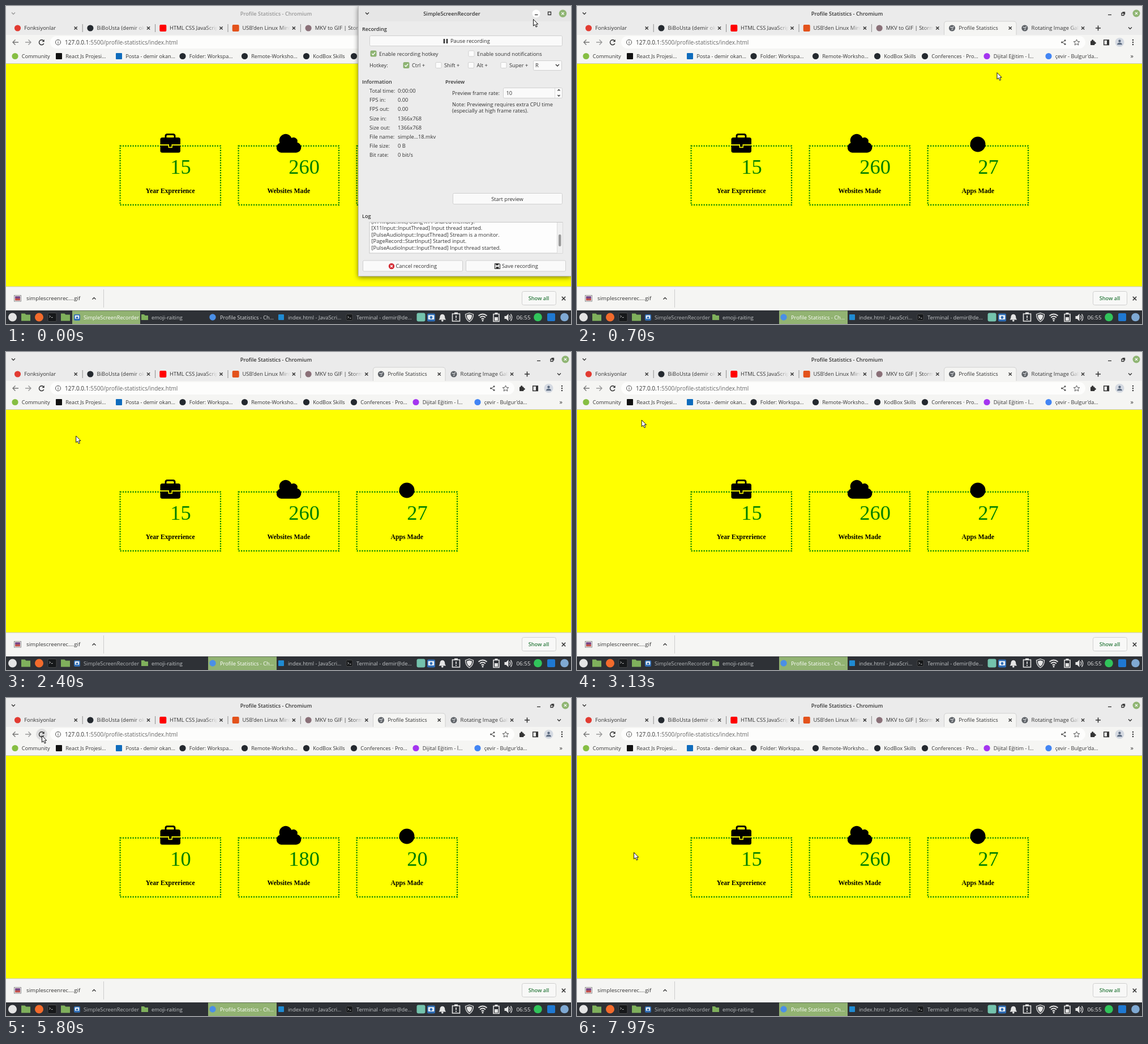
An HTML page for the animation above (8 s loop, 998x561 px).

```html
<!DOCTYPE html>
<html lang="en">
<head>
<meta charset="utf-8">
<title>Profile Statistics</title>
<style>
html, body { margin: 0; width: 100%; height: 100%; overflow: hidden; background: #ff0; }
svg { display: block; width: 998px; height: 561px; font: 9.3px "Open Sans", "Noto Sans", sans-serif; }
text { white-space: pre; }
.bold { font-weight: 600; }
.serif { font-family: "Liberation Serif", serif; }
</style>
</head>
<body>
<svg id="stage" viewBox="0 0 998 561"></svg>
<script>
const INK = '#333', BAR = '#ebebeb', TOOL = '#f5f5f3', GREEN = '#8fb573';

// Shape helpers return markup
const text = (x, y, s, size = 9.3, fill = INK, more = '') =>
  `<text x="${x}" y="${y}" font-size="${size}" fill="${fill}" ${more}>${s}</text>`;
const rect = (x, y, w, h, fill, more = '') =>
  `<rect x="${x}" y="${y}" width="${w}" height="${h}" fill="${fill}" ${more}/>`;
const disc = (x, y, r, fill, more = '') => `<circle cx="${x}" cy="${y}" r="${r}" fill="${fill}" ${more}/>`;
const path = (d, stroke = INK, w = 1.3, fill = 'none', more = '') =>
  `<path d="${d}" stroke="${stroke}" stroke-width="${w}" fill="${fill}" ${more}/>`;
const cross = (x, y, r = 2.6, c = INK, w = 1.4) =>
  path(`M${x - r} ${y - r}l${2 * r} ${2 * r}m0 ${-2 * r}l${-2 * r} ${2 * r}`, c, w);
const chevron = (x, y, up = 1, c = INK, r = 3) => path(`M${x - r} ${y + up * r / 2}l${r} ${-up * r}l${r} ${up * r}`, c, 1.3);
const bold = 'class="bold"', mid = 'text-anchor="middle"', boldMid = bold + ' ' + mid;

function windowButtons() {
  return path('M938 15.5h6', INK, 1.3) +
    path('M962 12.5h4v4h-4zm1.5-1.5h4v4') +
    disc(988, 13, 6.5, GREEN) + cross(988, 13, 2.2, '#fff', 1.2);
}

function tabs() {
  const list = [
    ['Fonksiyonlar', '#e23b32', 0], ['BiBoUsta (demir ok', '#24292f', 0], ['HTML CSS JavaScrip', '#f00', 1],
    ["USB'den Linux Mint", '#e3521b', 1], ['MKV to GIF | Storm', '#8a7078', 0],
    ['Profile Statistics', '#5f6368', 0], ['Rotating Image Gall', '#5f6368', 0]];
  let out = path('M648.5 51V32q0-5 5-5H771q5 0 5 5V51', '#d0d0d0', 1, TOOL);
  list.forEach(([name, color, square], i) => {
    const x = 20.5 + 128.4 * i;
    out += square ? rect(x - 6, 33, 12, 12, color, 'rx="2"') : disc(x, 39, 5.6, color);
    if (i > 4) out += path(`M${x - 3} 37q3 3 6-1m-4 6l3-2`, '#d8dadd', 1.3);
    out += text(x + 11.7, 42.3, name, 9.45);
    if (i != 5) out += rect(x + 76, 30, 20, 18, 'url(#fade)') + rect(x + 95.5, 30, 16, 18, BAR);
    out += cross(x + 102.7, 39);
    if (i < 4) out += path(`M${x + 114.7} 32v14`, '#8d8d8d', 1);
  });
  return out + path('M920.5 34.5v9m-4.5-4.5h9', INK, 1.6) + chevron(977, 39, -1);
}

function toolbar() {
  let out = rect(0, 51, 998, 50.5, TOOL) + rect(78, 53, 820, 22, '#fdfdfc', 'rx="11"') +
    path('M22 64H12m4.5-4.5L12 64l4.5 4.5', '#777', 1.4) +
    path('M34 64h10m-4.5-4.5L44 64l-4.5 4.5', '#999', 1.4) +
    disc(63, 64, 10, '#ddd', 'id="hover"') +
    path('M66.8 66.2A4.4 4.4 0 1 1 66 61', INK, 1.5) + path('M67.7 59v4.2h-4.2z', 'none', 0, INK) +
    disc(92, 64, 4.6, 'none', 'stroke="#555"') + path('M92 63.4v3.2m0-5.6v1.3', '#555', 1.1) +
    text(104, 67.6, '127.0.0.1<tspan fill="#666">:5500/profile-statistics/index.html</tspan>', 10.05) +
    path('M862 61l-5 3l5 3.2', '#555', 1) + disc(862, 60.7, 1.5, '#555') + disc(856.5, 64, 1.5, '#555') + disc(862, 67.3, 1.5, '#555') +
    path('M882.5 59l1.5 3.5l3.8.3l-2.9 2.5l.9 3.7l-3.3-2l-3.3 2l.9-3.7l-2.9-2.5l3.8-.3z', '#555', 1) +
    rect(907, 61.5, 7.5, 7.5, INK, 'rx="1"') + disc(910.7, 61, 1.7, INK) + disc(915, 65.2, 1.7, INK) +
    path('M930.7 60h8.6v8.6h-8.6z', INK, 1.5) + rect(936, 60, 3.5, 8.6, INK) +
    disc(958.5, 64, 8, '#d5dae2') + disc(958.5, 61.7, 2.2, '#5d6b80') + path('M954 68.3q0-3.6 4.5-3.6t4.5 3.6z', 'none', 0, '#5d6b80');
  for (const y of [60, 64, 68]) out += disc(982, y, 1.2, INK);
  const marks = [
    [16, 'Community', '#86be43', 0], [93.5, 'React Js Projesi…', '#111', 1], [199.5, 'Posta - demir okan…', '#0f6cbd', 1],
    [312, 'Folder: Workspa…', '#24292f', 0], [421.5, 'Remote-Worksho…', '#24292f', 0], [530.5, 'KodBox Skills', '#24292f', 0],
    [614.5, 'Conferences · Pro…', '#24292f', 0], [724, 'Dijital Eğitim - İ…', '#a435f0', 0], [833, "çevir - Bulgur'da…", '#4285f4', 0]];
  for (const [x, name, color, square] of marks)
    out += (square ? rect(x - 5.5, 83, 11, 11, color, 'rx="1"') : disc(x, 88.5, 5.6, color)) + text(x + 11.7, 92, name, 9.2);
  return out + text(977.5, 92, '»', 11) + path('M0 101.5h998', '#c9c9b8', 1);
}

function page() {
  let out = rect(0, 102, 998, 393, '#ff0');
  ['Year Exprerience', 'Websites Made', 'Apps Made'].forEach((name, i) => {
    const x = 290.3 + 209 * i;
    out += rect(x - 88.7, 246.8, 177.4, 104, 'none', 'stroke="green" stroke-width="2.2" stroke-dasharray="2.2 2.19"') +
      text(x, 296, '', 36.5, 'green', 'class="serif count"') +
      text(x, 330, name, 11.7, '#000', `class="serif" font-weight="bold" ${mid}`);
  });
  return out +
    path('M282 233v-3.5q0-3 3-3h10q3 0 3 3V233', '#000', 3) +
    rect(272.5, 232, 35.5, 26.8, '#000', 'rx="3.5"') + rect(272, 244.2, 37, 1.9, '#ff0') +
    rect(286.5, 244, 7.5, 6.3, '#ff0', 'rx="1"') + rect(288, 244, 4.5, 4.6, '#000') +
    path('M486 258.8a9 9 0 0 1-2.5-17.3a11.3 11.3 0 0 1 21-8.6a6.8 6.8 0 0 1 10 7.8a9.2 9.2 0 0 1-2 18.1z', 'none', 0, '#000') +
    disc(708, 244, 13.5, '#000');
}

function downloads() {
  return rect(0, 495, 998, 42, TOOL) + path('M0 495h998', '#c9c9b8', 1) +
    rect(14.5, 510.5, 12, 10.5, '#f4f4f4', 'stroke="#777" stroke-width=".8"') + rect(16, 512, 9, 4, '#7c4a86') + rect(16, 516, 9, 3.5, '#c1504a') +
    text(36, 519, 'simplescreenrec….gif', 9.75) + chevron(155.5, 516) + path('M172.5 500v32', '#ccc', 1) +
    rect(911.5, 503.5, 60, 24, '#f8f8f7', 'rx="3" stroke="#cfcfcf"') +
    text(941, 518.7, 'Show all', 9.2, '#2c7a3e', boldMid) + cross(985, 516, 3.2, INK, 1.6);
}

function panel() {
  const folder = (x, w = 15, h = 12) =>
    path(`M${x} ${549 - h / 2}h${w * .4}l2 2h${w * .6 - 2}v${h - 2}h${-w}z`, 'none', 0, '#7fb05c');
  const term = (x, s) => rect(x, 549 - s / 2, s, s, '#16181a', 'rx="2" stroke="#555" stroke-width=".7"') +
    path(`M${x + 2.5} ${551 - s / 3}l2 1.7l-2 1.7m3.5 0h2.5`, '#ddd', .9);
  const camera = (x, s) => rect(x, 549.5 - s / 2, s, s, '#2f6db5', 'rx="2"') +
    rect(x + 1.7, 548 - s / 5, s - 3.4, s * .55, '#e8eef5', 'rx="1"') + disc(x + s / 2, 549.5, s * .17, '#2f6db5');
  const task = (x, s, more = '') => text(x, 552.7, s, 9.3, '#c4c7c9', more);
  const W = '#e4e4e4';
  return rect(0, 537, 998, 24, '#2e3136') +
    rect(117, 537.5, 120, 23.5, '#92b372', 'id="taskRec"') + rect(357, 537.5, 121, 23.5, '#92b372', 'id="taskWeb"') +
    disc(11.5, 549, 7.5, W) + folder(27, 16, 13) + disc(58.5, 549, 7.5, '#f36b2c') + term(74, 15) + folder(97, 16, 13) +
    camera(120, 11) + task(137, 'SimpleScreenRecorder', 'id="nameRec"') + folder(239, 12, 10) + task(257, 'emoji-raiting') +
    disc(365, 549, 5.7, '#4a8fe7') + task(378, 'Profile Statistics - Ch…', 'id="nameWeb"') +
    rect(481, 544, 10, 10, '#1f8ad2', 'rx="1"') + task(498, 'index.html - JavaScri…') +
    term(601, 11) + task(619, 'Terminal - demir@de…') +
    rect(725.5, 541.5, 15, 15, '#74c3ad', 'rx="3"') + camera(744, 14) +
    path('M764.5 553.5q2-1.5 2-5.5a4.3 4.3 0 0 1 8.6 0q0 4 2 5.5z', 'none', 0, W) + disc(770.8, 555, 1.8, W) +
    path('M788.5 543h13v13h-13z', W, 1.6) + path('M795 546v4.5m0 1.5v2', W, 1.7) + rect(792, 540.5, 6, 3, W) +
    path('M818.5 541.5l7 2.5q0 9-7 13q-7-4-7-13z', W, 1.3) + path('M818.5 544l4.7 1.6q0 6-4.7 9q-4.7-3-4.7-9z', 'none', 0, W) +
    path('M834.5 546.5q7.5-6 15 0m-12.4 3q5-4 9.8 0m-7.2 3q2.3-2 4.6 0', W, 1.8) + disc(842, 555, 1.5, W) +
    path('M861 543.5h10v13h-10z', W, 1.6) + rect(863.5, 541, 5, 2, W) + rect(863, 549, 6, 6, W) +
    path('M880.5 547h3l4-4v13l-4-4h-3z', 'none', 0, W) + path('M889.5 546q2.5 3.5 0 7m2-9.5q4.5 6 0 12', W, 1.3) +
    text(901.5, 552.9, '06:55', 9.8, W) +
    disc(939.5, 549, 7.3, '#31c45b') + rect(956, 542, 14, 14, '#1f78d1', 'rx="2"') + disc(986.5, 549, 7.3, '#7fa9d3');
}

function recorder() {
  const button = (x, y, w, h = 19) => rect(x + .5, y + .5, w, h, '#fafafa', 'rx="2" stroke="#d0d0d0"');
  const check = (x, y, on) => rect(x, y, 10, 10, on ? GREEN : '#fcfcfc', `rx="1.5" stroke="${on ? '#7da463' : '#c8c8c8'}" stroke-width=".8"`) +
    (on ? path(`M${x + 2.3} ${y + 5}l2 2.2l3.8-4.4`, '#fff', 1.4) : '');
  let out = rect(622, 0, 376, 477, '#ececec', 'filter="url(#shadow)"') + rect(622, 0, 376, 27, '#e6e6e6') +
    path('M622.3 0V476.7H998', '#a9a9a9', .8) + chevron(638, 13, -1) +
    text(787.5, 17, 'SimpleScreenRecorder', 9.25, INK, boldMid) +
    disc(936.5, 13.5, 7, '#fdfdfd') + path('M934 15.5h5.5') + path('M957.5 10.5h5v5h-5z') +
    disc(983.5, 13.3, 6.7, GREEN) + cross(983.5, 13.3, 2.2, '#fff', 1.2);
  for (const [x, y, s] of [[629, 44, 'Recording'], [629, 136.5, 'Information'], [776, 136.5, 'Preview'], [629, 374, 'Log']])
    out += text(x, y, s, 9.1, INK, bold);
  out += button(642, 52, 340, 18) + path('M774 58v8m5-8v8', INK, 2.6) + text(785, 65.2, 'Pause recording') +
    check(644, 79, 1) + text(659, 87.8, 'Enable recording hotkey') + check(817, 79) + text(832, 87.8, 'Enable sound notifications') +
    text(642, 108, 'Hotkey:');
  [[702, 'Ctrl +'], [759, 'Shift +'], [816.5, 'Alt +'], [874, 'Super +']].forEach(([x, s], i) =>
    out += check(x, 99.5, !i) + text(x + 15, 108, s));
  out += button(931, 96, 50, 17) + text(935, 108, 'R') + chevron(974, 104.5, -1);
  [['Total time:', '0:00:00'], ['FPS in:', '0.00'], ['FPS out:', '0.00'], ['Size in:', '1366x768'], ['Size out:', '1366x768'],
    ['File name:', 'simple…18.mkv'], ['File size:', '0 B'], ['Bit rate:', '0 bit/s']].forEach(([a, b], i) =>
    out += text(642, 153.3 + 16.07 * i, a) + text(692, 153.3 + 16.07 * i, b));
  out += text(788, 157, 'Preview frame rate:') + button(878, 144, 104, 18) + text(883.5, 157, '10') +
    path('M969.5 145v17', '#ddd', 1) + chevron(976.5, 148.5, 1, INK, 2) + chevron(976.5, 158, -1, INK, 2) +
    text(788, 177, 'Note: Previewing requires extra CPU time') + text(788, 187.5, '(especially at high frame rates).') +
    button(789, 330, 193) + text(885.5, 343.8, 'Start preview', 9.3, INK, mid) +
    rect(642, 381.5, 341, 54.5, '#fdfdfd', 'stroke="#c8c8c8"') + '<g clip-path="url(#log)">';
  ['[X11Input::Init] Using X11 shared memory.', '[X11Input::InputThread] Input thread started.', '[PulseAudioInput::InputThread] Stream is a monitor.',
    '[PageRecord::StartInput] Started input.', '[PulseAudioInput::InputThread] Input thread started.'].forEach((s, i) =>
    out += text(645.5, 383.5 + 11.65 * i, s));
  return out + '</g>' + rect(974, 382, 9, 54, '#f0f0f0') + path('M973.5 382v54', '#ddd', 1) + rect(976, 403, 4.5, 21, '#9a9a9a', 'rx="2"') +
    button(630, 448.5, 176) + disc(681, 459, 5.2, '#d42a33') + cross(681, 459, 2, '#fff') + text(688.5, 462.3, 'Cancel recording') +
    button(812, 448.5, 176) + path('M863.5 454.5h7.5l1.5 1.5v7.5h-9z', INK, 1.2, '#fff') + rect(865, 454.5, 5, 3, INK) + rect(865.5, 460, 5, 3.5, INK) +
    text(876, 462.3, 'Save recording');
}

const stage = document.getElementById('stage');
stage.innerHTML = `<defs>
  <linearGradient id="fade"><stop stop-color="${BAR}" stop-opacity="0"/><stop offset="1" stop-color="${BAR}"/></linearGradient>
  <filter id="shadow" x="-10%" y="-10%" width="120%" height="120%"><feDropShadow dx="0" dy="2" stdDeviation="4" flood-opacity=".5"/></filter>
  <clipPath id="log"><rect x="642" y="382" width="331" height="54"/></clipPath></defs>` +
  rect(0, 0, 998, 51, BAR) + `<g id="caption">${chevron(13, 13, -1)}${text(477, 17, 'Profile Statistics - Chromium', 9.25, INK, boldMid)}${windowButtons()}</g>` +
  tabs() + toolbar() + page() + downloads() + panel() +
  `<g id="recorder">${recorder()}</g>` +
  `<g id="tip">${rect(71.5, 78.5, 83, 18, '#f3e99c', 'stroke="#6b6640" filter="url(#shadow)"')}${text(76.5, 90.7, 'Reload this page', 9.2, '#444')}</g>` +
  path('M0 0V11.6l2.7-2.4l2 4.4l2-.9l-1.9-4.2h3.5z', '#111', 1, '#fff', 'id="cursor"');

const el = id => document.getElementById(id);
const counts = [...document.querySelectorAll('.count')];
const show = (id, on) => el(id).setAttribute('visibility', on ? 'visible' : 'hidden');

// Pointer way points: time, x, y
const way = [[0, 931.5, 23.5], [180, 932, 21], [350, 915, 35], [700, 742.7, 117.5], [1150, 400, 150], [1700, 147.7, 141],
  [2300, 125, 152], [3130, 114.2, 120], [3450, 112, 118], [3950, 63.5, 66.5], [7080, 63.5, 66.5], [7870, 95, 291], [7970, 100.5, 272.5], [8000, 100.5, 272.5]];
// Counters: final value, ms per step
const goals = [[15, 70], [260, 4.08], [27, 36.5]];
const RELOAD = 5065;

function draw(t) {
  const i = way.findIndex(k => k[0] > t), [a, b] = [way[i - 1], way[i]];
  const f = (t - a[0]) / (b[0] - a[0]);
  el('cursor').setAttribute('transform', `translate(${a[1] + (b[1] - a[1]) * f} ${a[2] + (b[2] - a[2]) * f})`);

  // The recorder shrinks into its taskbar entry
  const m = Math.min(1, Math.max(0, (t - 180) / 200)), k = 1 - m * m * .9;
  el('recorder').setAttribute('transform', `translate(${177 * (1 - k)} ${549 * (1 - k)}) scale(${k})`);
  el('recorder').setAttribute('opacity', 1 - m);
  const web = t >= 200;
  show('taskRec', !web);
  show('taskWeb', web);
  el('nameRec').setAttribute('fill', web ? '#b4b7b9' : '#fff');
  el('nameWeb').setAttribute('fill', web ? '#fff' : '#d8dadc');
  el('caption').setAttribute('opacity', web ? 1 : .45);

  show('hover', t > 3900 && t < 7110);
  show('tip', t > 4500 && t < 5000);
  goals.forEach(([goal, step], n) => {
    counts[n].textContent = t < RELOAD ? goal : Math.min(goal, Math.floor((t - RELOAD) / step));
  });
}

function tick() {
  draw(performance.now() % 8000);
  requestAnimationFrame(tick);
}
tick();
</script>
</body>
</html>
```
